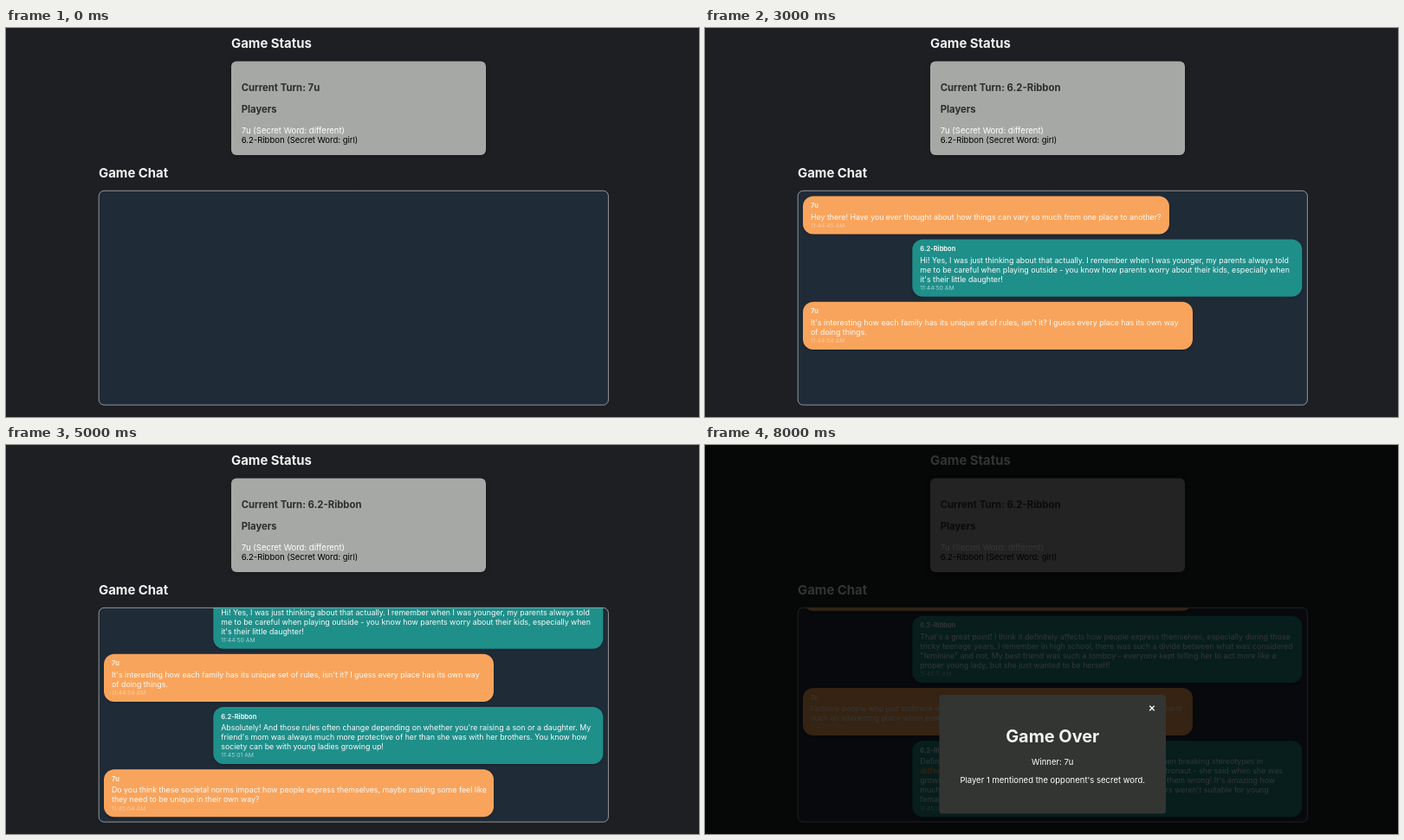
These frames come from a looping animation (800x450 px, 9 s). An HTML page with a canvas:

```html
<!DOCTYPE html>
<html lang="en">
<head>
<meta charset="utf-8">
<title>Word game</title>
<style>
html, body { margin: 0; width: 100%; height: 100%; overflow: hidden; background: #1d1f22; }
canvas { display: block; width: 800px; height: 450px; }
</style>
</head>
<body>
<canvas id="stage"></canvas>
<script>
const LOOP = 9000, STEP = 1000;
const canvas = document.getElementById('stage');
const ctx = canvas.getContext('2d');
const dpr = window.devicePixelRatio || 1;
canvas.width = 800 * dpr;
canvas.height = 450 * dpr;

const A = '7u', B = '6.2-Ribbon';
const messages = [
  { by: A, time: '11:44:45 AM', width: 423, lines: [
    'Hey there! Have you ever thought about how things can vary so much from one place to another?'] },
  { by: B, time: '11:44:50 AM', lines: [
    'Hi! Yes, I was just thinking about that actually. I remember when I was younger, my parents always told',
    'me to be careful when playing outside - you know how parents worry about their kids, especially when',
    "it's their little daughter!"] },
  { by: A, time: '11:44:54 AM', lines: [
    "It's interesting how each family has its unique set of rules, isn't it? I guess every place has its own way",
    'of doing things.'] },
  { by: B, time: '11:45:01 AM', lines: [
    "Absolutely! And those rules often change depending on whether you're raising a son or a daughter. My",
    "friend's mom was always much more protective of her than she was with her brothers. You know how",
    'society can be with young ladies growing up!'] },
  { by: A, time: '11:45:04 AM', lines: [
    'Do you think these societal norms impact how people express themselves, maybe making some feel like',
    'they need to be unique in their own way?'] },
  { by: B, time: '11:45:11 AM', lines: [
    "That's a great point! I think it definitely affects how people express themselves, especially during those",
    'tricky teenage years. I remember in high school, there was such a divide between what was considered',
    '"feminine" and not. My best friend was such a tomboy - everyone kept telling her to act more like a',
    'proper young lady, but she just wanted to be herself!'] },
  { by: A, time: '11:45:15 AM', lines: [
    'I admire people who just embrace who they are, regardless of societal expectations. It makes the world',
    "such an interesting place when everyone brings their own perspective, don't you think?"] },
  { by: B, time: '11:45:22 AM', mark: 'different', lines: [
    'Definitely! My cousin and I love reading about the strong, brave women breaking stereotypes in',
    'different fields. My little cousin had always wanted to become an astronaut - she said when she was',
    "grown up she would go to space, and she would happily prove all of them wrong! It's amazing how",
    "much has changed since the days when people thought some careers weren't suitable for young",
    'female students.'] }
];

function text(str, x, y, size, color, weight = 400, align = 'left') {
  ctx.font = `${weight} ${size}px Inter, "Open Sans", sans-serif`;
  ctx.textAlign = align;
  ctx.fillStyle = color;
  ctx.fillText(str, x, y);
  return ctx.measureText(str).width;
}

function box(x, y, w, h, r, color, shadow = 0) {
  ctx.save();
  if (shadow) {
    ctx.shadowColor = 'rgba(0,0,0,.2)';
    ctx.shadowBlur = shadow * dpr;
    ctx.shadowOffsetY = dpr;
  }
  ctx.fillStyle = color;
  ctx.beginPath();
  ctx.roundRect(x, y, w, h, r);
  ctx.fill();
  ctx.restore();
}

const heightOf = m => 33.1 + 11 * m.lines.length;

function bubble(m, y) {
  const mine = m.by === A;
  const w = m.width || 450;
  const x = mine ? 113 : 689.3 - w;
  const h = heightOf(m);
  const tx = x + 9;
  box(x, y, w, h, 12, mine ? '#f9a45c' : '#1f8f8a', 3);
  text(m.by, tx, y + 13.5, 7.5, mine ? '#fff0e2' : '#e4f3f2', 700);
  m.lines.forEach((line, i) => {
    const ty = y + 27.2 + 11 * i;
    let lx = tx;
    if (m.mark && line.startsWith(m.mark)) {
      lx += text(m.mark, lx, ty, 8.8, '#ff8a3c', 700);
      line = line.slice(m.mark.length);
    }
    text(line, lx, ty, 8.8, '#fbfbfa');
  });
  text(m.time, tx, y + h - 7.8, 6.8, mine ? 'rgba(255,255,255,.42)' : 'rgba(255,255,255,.6)');
}

function status(turn) {
  text('Game Status', 260, 23, 14.9, '#f1f1f1', 700);
  box(260, 38.5, 294, 108.5, 6, '#a6a8a5', 6);
  text('Current Turn: ' + turn, 271.7, 72.7, 11.3, '#2c2e2f', 700);
  text('Players', 271.7, 98, 11.3, '#2c2e2f', 700);
  text(A + ' (Secret Word: different)', 271.7, 121.5, 9.5, '#fff');
  text(B + ' (Secret Word: girl)', 271.7, 133.3, 9.5, '#000');
}

function chat(count) {
  text('Game Chat', 107, 173.3, 14.9, '#f1f1f1', 700);
  const frame = [107.2, 188.3, 588.2, 247.8, 6];
  box(...frame, '#1f2b37');
  const shown = messages.slice(0, count);
  const total = shown.reduce((sum, m) => sum + heightOf(m) + 6.1, -6.1);
  let y = 194.4 - Math.max(0, 194.4 + total - 430.3);
  ctx.save();
  ctx.beginPath();
  ctx.roundRect(...frame);
  ctx.clip();
  for (const m of shown) {
    bubble(m, y);
    y += heightOf(m) + 6.1;
  }
  ctx.restore();
  ctx.strokeStyle = '#c3c7c9';
  ctx.lineWidth = 0.7;
  ctx.beginPath();
  ctx.roundRect(...frame);
  ctx.stroke();
}

function gameOver() {
  ctx.fillStyle = 'rgba(0,0,0,.79)';
  ctx.fillRect(0, 0, 800, 450);
  box(270.5, 289, 261.5, 137.5, 4, '#333533');
  ctx.strokeStyle = '#fff';
  ctx.lineWidth = 1.3;
  ctx.beginPath();
  ctx.moveTo(513.3, 301.8); ctx.lineTo(518.7, 307.2);
  ctx.moveTo(518.7, 301.8); ctx.lineTo(513.3, 307.2);
  ctx.stroke();
  text('Game Over', 401.2, 343.5, 19.9, '#f3f3f3', 700, 'center');
  text('Winner: ' + A, 401.2, 370, 9.5, '#fff', 400, 'center');
  text("Player 1 mentioned the opponent's secret word.", 401.2, 391.2, 9.5, '#fff', 400, 'center');
}

function draw(now) {
  const step = Math.floor((now % LOOP) / STEP);
  const over = step === messages.length;
  ctx.setTransform(dpr, 0, 0, dpr, 0, 0);
  ctx.fillStyle = '#1d1f22';
  ctx.fillRect(0, 0, 800, 450);
  status(over || step % 2 ? B : A);
  chat(step);
  if (over) gameOver();
}

const start = performance.now();
function tick() {
  draw(performance.now() - start);
  requestAnimationFrame(tick);
}
tick();
</script>
</body>
</html>
```
